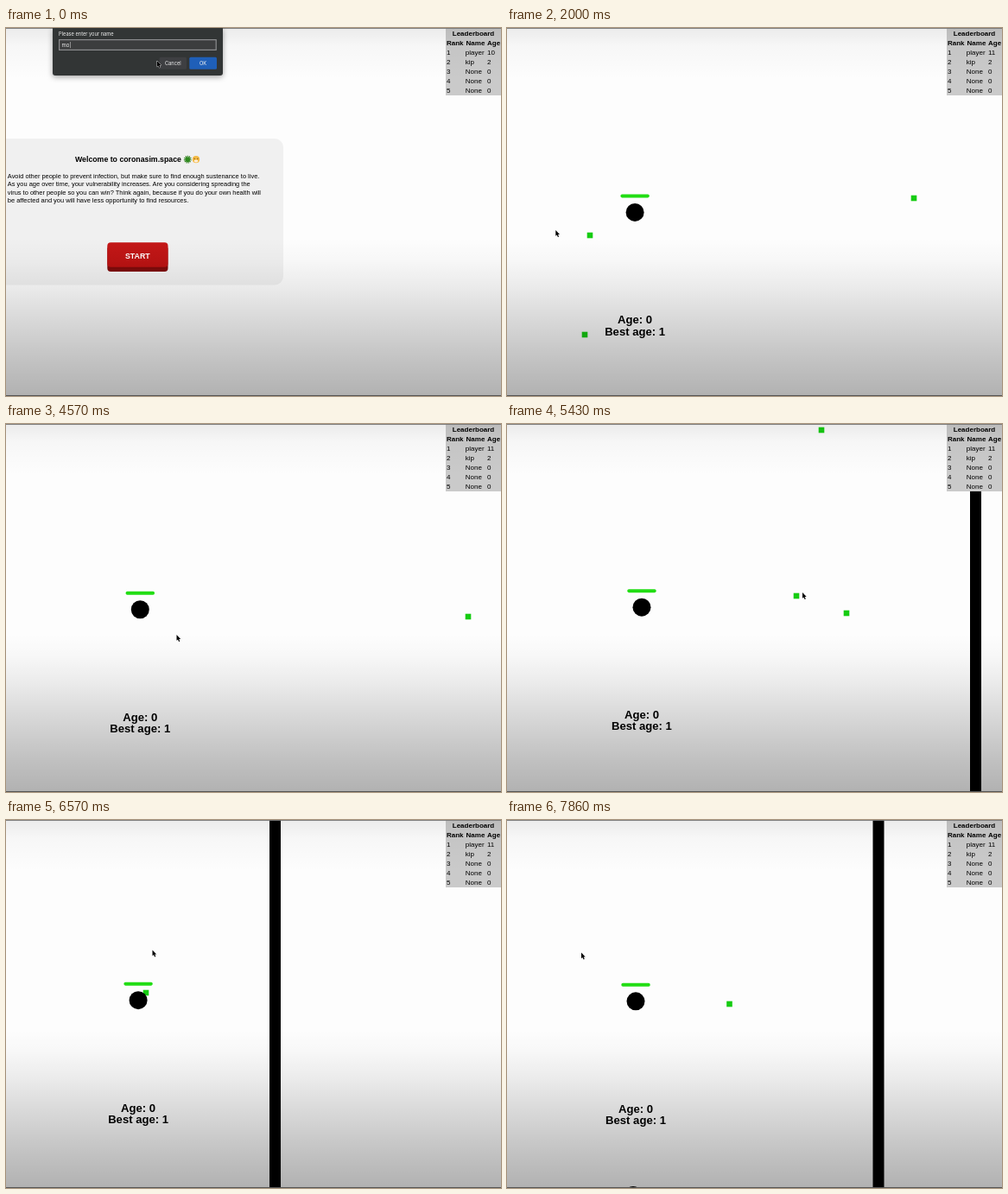
These frames come from a looping animation (573 px wide and 426 px high, 8000 ms). An HTML page:

```html
<!DOCTYPE html>
<html lang="en">
<head>
<meta charset="utf-8">
<title>Virus game</title>
<style>
  html, body { margin: 0; width: 100%; height: 100%; overflow: hidden; background: #fdfdfd; }
  svg { display: block; width: 100vw; height: 100vh; font-family: "Liberation Sans", Arial, sans-serif; }
  .b { font-weight: bold; }
  .mid { text-anchor: middle; }
  #dialog { font-family: Inter, Roboto, sans-serif; font-size: 5.7px; fill: #f2f2f2; }
</style>
</head>
<body>
<svg viewBox="0 0 573 426" preserveAspectRatio="none">
  <defs>
    <linearGradient id="shade" x1="0" y1="0" x2="0" y2="1">
      <stop offset="0" stop-opacity=".07"/>
      <stop offset=".05" stop-opacity=".025"/>
      <stop offset=".14" stop-opacity="0"/>
      <stop offset=".57" stop-opacity="0"/>
      <stop offset=".63" stop-opacity=".022"/>
      <stop offset=".7" stop-opacity=".07"/>
      <stop offset=".78" stop-opacity=".135"/>
      <stop offset=".9" stop-opacity=".23"/>
      <stop offset="1" stop-opacity=".3"/>
    </linearGradient>
    <linearGradient id="red" x1="0" y1="0" x2="0" y2="1">
      <stop offset="0" stop-color="#c41717"/>
      <stop offset="1" stop-color="#b81212"/>
    </linearGradient>
    <filter id="drop" x="-10%" y="-10%" width="120%" height="140%">
      <feDropShadow dx="0" dy="2" stdDeviation="3" flood-opacity=".35"/>
    </filter>
  </defs>
  <rect width="573" height="426" fill="#fdfdfd"/>

  <g id="welcome">
    <rect x="-20" y="128" width="341" height="169.500" rx="10" fill="#f0f0f0"/>
    <text class="b" x="80" y="155" font-size="8.75">Welcome to coronasim.space</text>
    <circle cx="210.300" cy="152.200" r="3.600" fill="none" stroke="#2f7d1c" stroke-width="1.700" stroke-dasharray="1.100 .9"/>
    <circle cx="210.300" cy="152.200" r="2.900" fill="#2f8a1e"/>
    <circle cx="220" cy="152.200" r="4.100" fill="#f4b942"/>
    <path d="M217.500 151l1.500.6M222.500 151l-1.500.6" stroke="#6b4313" stroke-width=".8"/>
    <ellipse cx="220" cy="154" rx="2.300" ry="1.500" fill="#fbeedd"/>
    <g id="blurb" font-size="7.460"></g>
    <rect x="117.300" y="252" width="70.200" height="30" rx="4" fill="#7d0a0a"/>
    <rect x="117.300" y="248.300" width="70.200" height="28.500" rx="4" fill="url(#red)"/>
    <text class="b mid" x="152.300" y="266.800" font-size="8.800" fill="#fff">START</text>
  </g>

  <g id="game">
    <g id="foods" fill="#16cc12"></g>
    <circle id="other" r="10.500"/>
    <rect id="wall" y="0" width="13" height="426"/>
    <g id="player" class="b mid" font-size="13.100">
      <circle r="10.500"/>
      <rect x="-16.700" y="-21" width="33.400" height="4" rx="1.800" fill="#22dd14"/>
      <text y="129">Age: 0</text>
      <text y="142.300">Best age: 1</text>
    </g>
  </g>

  <rect x="509" y="0" width="64" height="78" fill="#cacaca"/>
  <g id="board" font-size="8"></g>

  <rect width="573" height="426" fill="url(#shade)"/>
  <rect width="573" height=".9" fill="#777"/>
  <rect y="425" width="573" height="1" fill="#555"/>

  <g id="dialog">
    <path d="M54 0H251V52q0 3-3 3H57q-3 0-3-3z" fill="#333436" filter="url(#drop)"/>
    <text x="61" y="9">Please enter your name</text>
    <rect x="61.600" y="13.600" width="181.600" height="11.800" fill="#3c3d3e" stroke="#8b8c8e" stroke-width="1.200"/>
    <text id="typed" x="64.600" y="21.800" font-size="6"></text>
    <rect x="177.500" y="33.800" width="31.500" height="14" rx="1.500" fill="#3e3f42"/>
    <text class="mid" x="193.300" y="42.900">Cancel</text>
    <rect x="212.300" y="33.800" width="31.700" height="14" rx="1.500" fill="#1f5fb8"/>
    <text class="mid" x="228" y="42.900">OK</text>
  </g>
  <path id="cursor" d="M0 0V6.700L1.500 5.400L2.600 8L3.800 7.500L2.700 5H4.700z" stroke="#fff" stroke-width=".7" paint-order="stroke"/>
</svg>
<script>
const NS = "http://www.w3.org/2000/svg";
const $ = id => document.getElementById(id);
const LOOP = 8000, STEP = 1000 / 7;
const DIALOG_END = 995, GAME_START = 1135;

function add(parent, tag, attrs, text) {
  const el = document.createElementNS(NS, tag);
  for (const key in attrs) el.setAttribute(key, attrs[key]);
  if (text !== undefined) el.textContent = text;
  parent.append(el);
  return el;
}
const move = (el, x, y) => el.setAttribute("transform", `translate(${x.toFixed(2)} ${y.toFixed(2)})`);
const show = (el, on) => el.setAttribute("visibility", on ? "visible" : "hidden");

[
  "Avoid other people to prevent infection, but make sure to find enough sustenance to live.",
  "As you age over time, your vulnerability increases. Are you considering spreading the",
  "virus to other people so you can win? Think again, because if you do your own health will",
  "be affected and you will have less opportunity to find resources."
].forEach((line, i) => add($("blurb"), "text", { x: 1.8, y: 173.8 + i * 9.4 }, line));

const board = $("board");
add(board, "text", { class: "b mid", x: 541, y: 9 }, "Leaderboard");
["Rank", "Name", "Age"].forEach((head, i) =>
  add(board, "text", { class: "b", x: [510, 532.6, 557][i], y: 19.9 }, head));
const ages = [["player", 10], ["kip", 2], ["None", 0], ["None", 0], ["None", 0]].map(([name, age], i) => {
  const y = 30.9 + i * 11;
  add(board, "text", { x: 510, y }, i + 1);
  add(board, "text", { x: 531.8, y }, name);
  return add(board, "text", { x: 557, y }, age);
});

// Keys are [time, x, y]
const pointerKeys = [
  [0, 174.8, 38], [290, 178, 39], [570, 222, 41], [710, 228, 41], [1000, 225, 45],
  [1140, 205, 90], [1500, 110, 200], [2000, 56.3, 234], [2300, 57, 238], [2700, 95, 262],
  [3140, 162, 270], [3290, 177, 267.5], [4290, 196, 256], [4570, 197.5, 244], [4900, 265, 215],
  [5430, 342, 195], [5860, 353.5, 196.5], [6100, 335, 204], [6350, 230, 236], [6570, 169.5, 150.5],
  [6900, 125, 135], [7300, 48, 148], [7560, 42, 151], [7710, 61, 153], [7860, 86, 153.5]
];
const cameraKeys = [
  [1140, 45, 12], [1500, 60, 4], [2000, 0, 0], [2300, -55, 8], [2700, -78, 30],
  [3140, -79, 83], [3290, -77, 116], [3850, -5, 235], [4570, 134, 321], [4860, 198, 345],
  [5430, 334, 345], [5860, 437, 338], [6160, 503, 336], [6400, 550, 362], [6570, 565, 364],
  [6800, 565, 322], [7200, 530, 240], [7710, 471, 163], [7860, 446.5, 139]
];

// World position, then the time span in which the food exists
const foods = [
  [96, 240, 0, 2420], [471, 197, 0, 4500], [90, 355, 0, 3400], [263, 513, 0, 4420],
  [669, 544, 3500, 6130], [698, 352, 4400, 6600], [727, 564, 4400, 6650], [704, 352, 6600, LOOP]
].map(([x, y, from, to]) => ({
  x, y, from, to,
  el: add($("foods"), "rect", { x: -3.3, y: -3.3, width: 6.6, height: 6.6 })
}));

// Cubic Hermite through the keys, tangents from the neighbours
function along(keys, t) {
  const last = keys.length - 1;
  if (t <= keys[0][0]) return keys[0].slice(1);
  if (t >= keys[last][0]) return keys[last].slice(1);
  const i = keys.findIndex(k => k[0] > t) - 1;
  const a = keys[i], b = keys[i + 1];
  const before = keys[Math.max(i - 1, 0)], after = keys[Math.min(i + 2, last)];
  const span = b[0] - a[0], u = (t - a[0]) / span, v = 1 - u;
  return [1, 2].map(c => {
    const ma = (b[c] - before[c]) / (b[0] - before[0]) * span;
    const mb = (after[c] - a[c]) / (after[0] - a[0]) * span;
    return a[c] * (1 + 2 * u) * v * v + ma * u * v * v + b[c] * u * u * (3 - 2 * u) - mb * u * u * v;
  });
}

function draw(t) {
  const playing = t >= GAME_START;
  show($("dialog"), t < DIALOG_END);
  show($("welcome"), !playing);
  show($("game"), playing);
  ages[0].textContent = playing ? 11 : 10;
  $("typed").textContent = "mossy".slice(0, 2 + Math.floor(t / 138)) + "|";

  const [px, py] = along(pointerKeys, t);
  move($("cursor"), px, py);

  // The player leans towards the pointer around a fixed centre
  const dx = px - 152, dy = py - 212.5, lean = 4 / Math.hypot(dx, dy);
  move($("player"), 152 + dx * lean, 212.5 + dy * lean);

  const [cx, cy] = along(cameraKeys, t);
  for (const f of foods) {
    f.el.setAttribute("display", t >= f.from && t < f.to ? "inline" : "none");
    move(f.el, f.x - cx, f.y - cy);
  }
  $("wall").setAttribute("x", (870 - cx).toFixed(2));
  move($("other"), 146, t < 7850 ? 460 : 434.5);
}

// The picture advances seven times a second
function tick(now) {
  const t = now % LOOP;
  draw(Math.round(Math.floor((t + 5) / STEP) * STEP / 10) * 10 % LOOP);
  requestAnimationFrame(tick);
}
draw(0);
requestAnimationFrame(tick);
</script>
</body>
</html>
```
